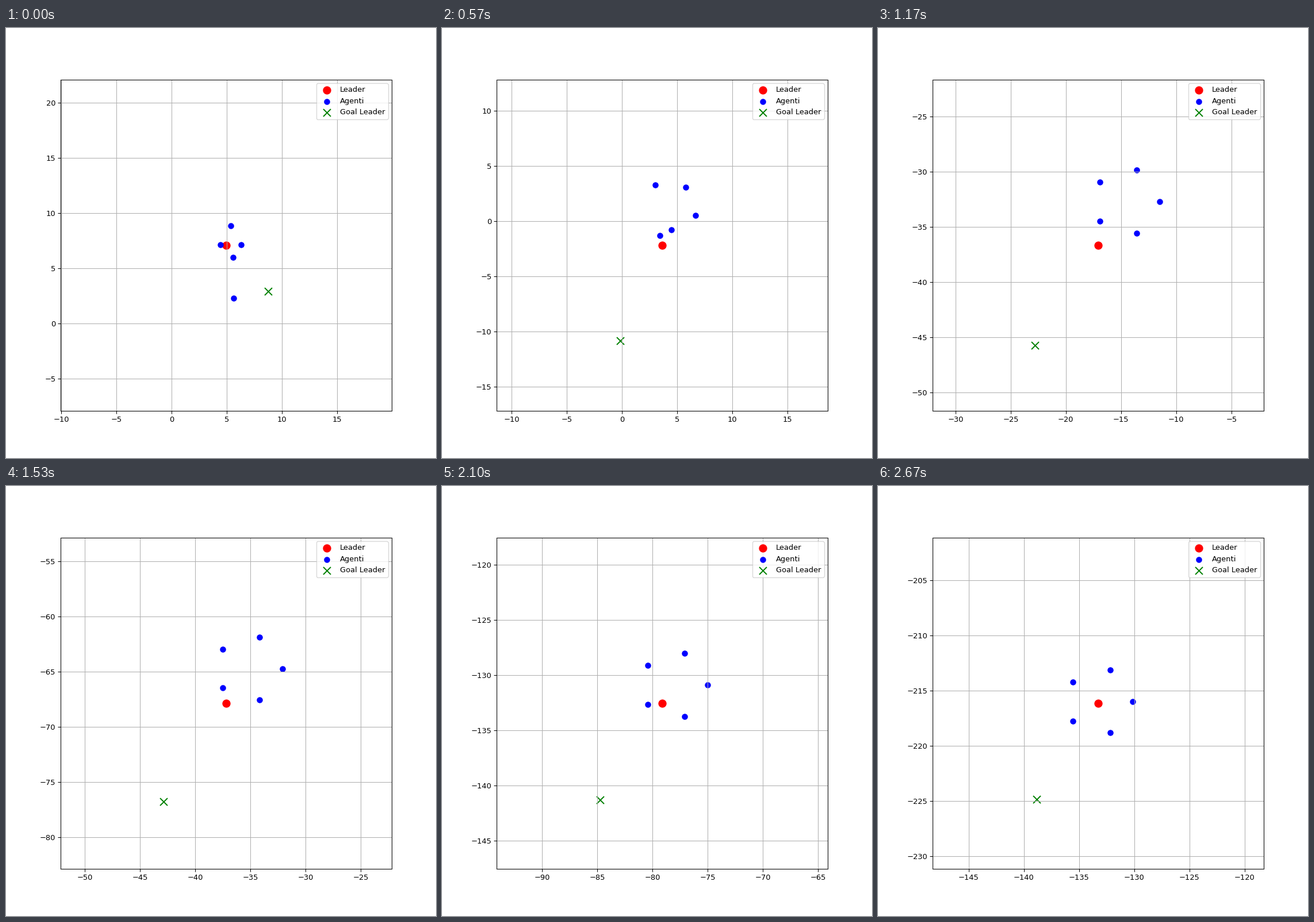
These frames come from a looping animation (748x748 px, 2.7 s). A matplotlib script:

```python
import numpy as np
import matplotlib.pyplot as plt
from matplotlib.animation import FuncAnimation

FRAMES, INTERVAL = 90, 30
VIEW = 15        # half width of the view around the leader
RADIUS = 3       # radius of the pentagon formation
CLOSING = 36     # steps until every agent sits in its slot
SWIRL = 0.016    # turn of the slot errors per step, in radians

# Complex numbers hold the formation: real part is x, imaginary part is y
SLOTS = RADIUS * np.exp(2j * np.pi * np.arange(5) / 5)
FIRST_ERRORS = np.array([-2.89 - 0.27j, -0.10 - 2.01j, 2.34 + 0.83j,
                         2.59 - 2.25j, -1.94 + 3.70j])


def fade(k, start, tau, power):
    """Transient that dies away, one value per axis."""
    return np.array(start) * np.exp(-(k / np.array(tau)) ** np.array(power))


def goal_at(k):
    """Uniformly accelerated goal."""
    return np.array([8.76, 2.94]) - np.array([0.01699, 0.026225]) * k * (k + 8.6)


def leader_at(k):
    """Leader swings in behind the goal, then slowly settles."""
    settled = np.array([5.5, 8.6]) + np.array([1.0, 1.55]) * np.exp(-0.03 * k)
    swing = fade(k, (-10.31, -5.99), (14.64, 12.75), (1.6, 1.7))
    return goal_at(k) + settled + swing


def agents_at(k):
    """Formation gathers behind the leader and steadily catches up with it."""
    trail = np.array([0.133, 0.16]) + np.array([0.0513, 0.0787]) * (FRAMES - 1 - k)
    gather = fade(k, (-4.2, -7.98), (25.5, 17.5), (2.8, 1.7))
    closing = max(0, 1 - k / CLOSING) ** 1.3
    spots = SLOTS + FIRST_ERRORS * closing * np.exp(1j * SWIRL * k)
    return leader_at(k) + trail + gather + np.column_stack([spots.real, spots.imag])


fig, ax = plt.subplots(figsize=(8, 8), dpi=93.5)
ax.set_aspect("equal")
ax.grid(True)
leader_dot = ax.scatter([], [], s=100, c="red", label="Leader")
agent_dots = ax.scatter([], [], s=50, c="blue", label="Agenti")
goal_mark = ax.scatter([], [], s=100, c="green", marker="x", label="Goal Leader")
ax.legend(loc="upper right")


def update(k):
    x, y = leader_at(k)
    leader_dot.set_offsets([(x, y)])
    agent_dots.set_offsets(agents_at(k))
    goal_mark.set_offsets([goal_at(k)])
    ax.set_xlim(x - VIEW, x + VIEW)
    ax.set_ylim(y - VIEW, y + VIEW)
    return leader_dot, agent_dots, goal_mark


anim = FuncAnimation(fig, update, frames=FRAMES, interval=INTERVAL,
                     repeat=True, blit=False)
plt.show()
```
